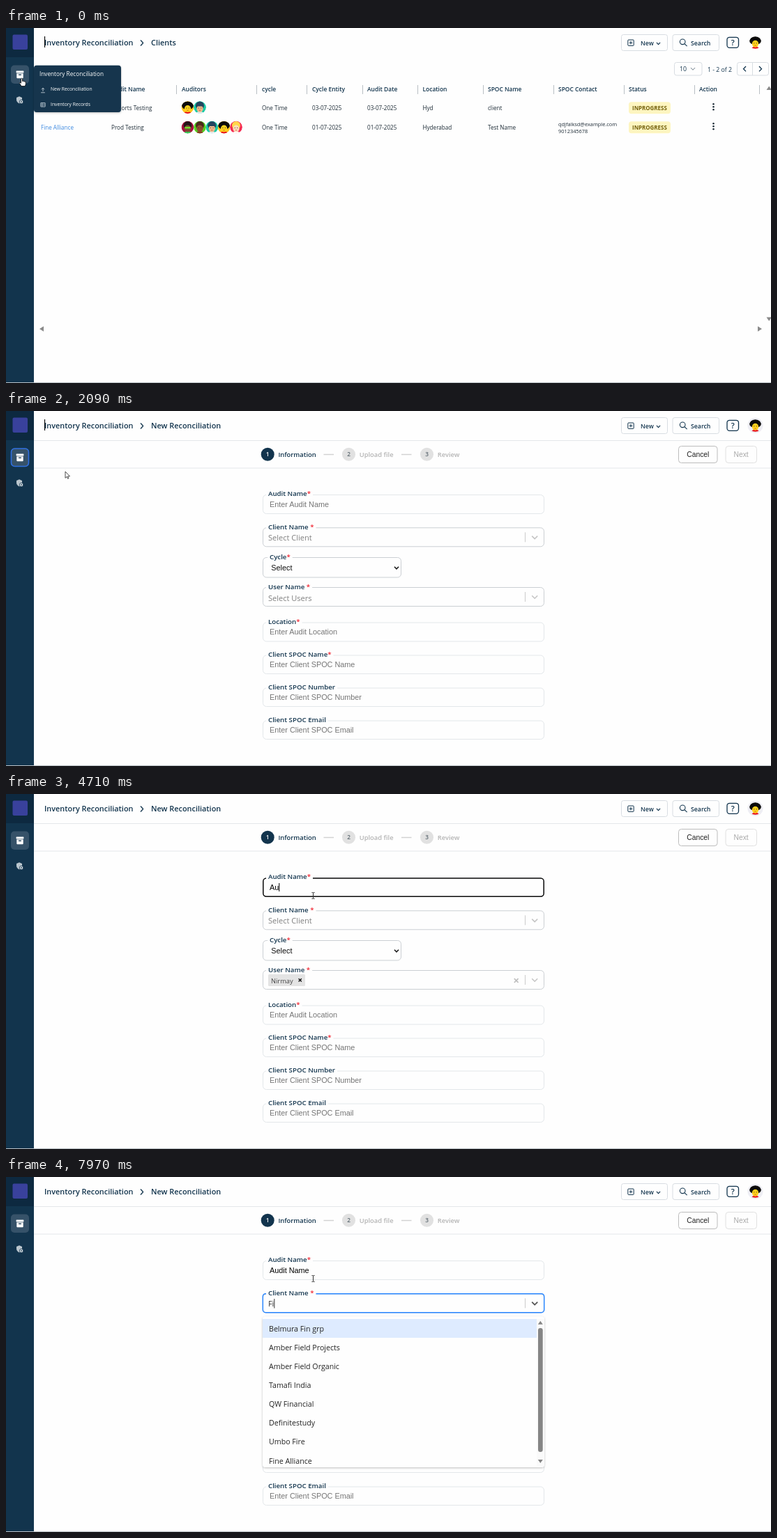
Animation, 1097 px wide and 510 px high, one loop 8 s. Source, as an HTML page:

```html
<!DOCTYPE html>
<html lang="en">
<head>
<meta charset="utf-8">
<title>Inventory Reconciliation</title>
<style>
  html, body { margin: 0; width: 100%; height: 100%; overflow: hidden; background: #fefefe; }
  svg { display: block; width: 100%; height: 100%; }
  text { font-family: "Open Sans", "Noto Sans", sans-serif; white-space: pre; }
  .input { font-family: "Liberation Sans", Arial, sans-serif; }
</style>
</head>
<body>
<svg id="stage" viewBox="0 0 1097 510"></svg>
<script>
const LOOP = 8000, NAVY = '#12344d', GREY = '#757575';
const stage = document.getElementById('stage');

// y is the middle of the capitals
const text = (x, y, s, size, fill = NAVY, weight = 400, attrs = '') =>
  `<text x="${x}" y="${(y + size * 0.357).toFixed(2)}" font-size="${size}" font-weight="${weight}" fill="${fill}" ${attrs}>${s}</text>`;
const input = (x, y, s, fill = GREY, size = 10.85, attrs = '') =>
  text(x, y, s, size, fill, 400, `class="input" ${attrs}`);
const rect = (x, y, w, h, fill, r = 0, attrs = '') =>
  `<rect x="${x}" y="${y}" width="${w}" height="${h}" rx="${r}" fill="${fill}" ${attrs}/>`;
const box = (x, y, w, h, stroke, r = 4, width = 1, attrs = '') =>
  rect(x, y, w, h, 'none', r, `stroke="${stroke}" stroke-width="${width}" ${attrs}`);
const line = (d, stroke, width = 1, attrs = '') =>
  `<path d="${d}" fill="none" stroke="${stroke}" stroke-width="${width}" ${attrs}/>`;
const shape = (d, fill, attrs = '') => `<path d="${d}" fill="${fill}" ${attrs}/>`;
const dot = (x, y, r, fill, attrs = '') => `<circle cx="${x}" cy="${y}" r="${r}" fill="${fill}" ${attrs}/>`;
const oval = (x, y, rx, ry, fill) => `<ellipse cx="${x}" cy="${y}" rx="${rx}" ry="${ry}" fill="${fill}"/>`;
const group = (id, body, attrs = '') => `<g id="${id}" ${attrs}>${body}</g>`;
const chevron = (x, y, w, h, stroke, width = 1.2) =>
  line(`M${x - w} ${y - h / 2}l${w} ${h}l${w} ${-h}`, stroke, width);
const cross = (x, y, r, stroke, width) =>
  line(`M${x - r} ${y - r}l${2 * r} ${2 * r}m0 ${-2 * r}l${-2 * r} ${2 * r}`, stroke, width);

function avatar(x, y, bg, hair, skin, shirt, extra = '', hairWidth = 6) {
  return `<g transform="translate(${x} ${y})" clip-path="url(#face)">` +
    dot(0, 0, 9, bg) + oval(0, -2.5, hairWidth, 6, hair) + oval(0, 9, 6, 3, shirt) +
    oval(0, 2, 4.6, 5, skin) +
    dot(-1.7, 1, .6, '#222') + dot(1.7, 1, .6, '#222') +
    line('M-1.2 4q1.2 1 2.4 0', '#a33', .7) + extra + '</g>';
}
const curly = (x, y, bg) => avatar(x, y, bg, '#0b0b0b', '#ffd21c', '#e8121c', '', 8.4);
const capped = (x, y) => avatar(x, y, '#19cba6', '#24445f', '#f0b98a', '#e9eef2',
  rect(-6, -4, 11, 2.4, '#24445f', 1));
const shades = rect(-4.2, -.6, 8.4, 2.6, '#6ee02a', 1);

function header() {
  return rect(0, 0, 40, 510, NAVY) + rect(0, 0, 40, 42, '#0d2940') +
    rect(9.5, 9.5, 21.5, 21.5, '#39419c', 2) +
    rect(7, 53.5, 26, 26.5, '#365269', 5) +
    box(7.5, 54, 25, 25.5, '#2f6fe0', 5, 1.6, 'id="ring"') +
    rect(14.6, 61.4, 10.8, 3, '#fff', .6) +
    shape('M15.3 65.2h9.4v6q0 1-1 1h-7.4q-1 0-1-1zM18 66.6v1.3h4v-1.3z', '#fff', 'fill-rule="evenodd"') +
    shape('M15 100l4-1.7l4 1.7v3.2q-.3 3.6-4 5.2q-3.7-1.6-4-5.2z', '#b9c5cd') +
    dot(22, 106, 2.7, '#dfe6ea', `stroke="${NAVY}" stroke-width=".8"`) + dot(22, 106, .9, NAVY) +
    text(55, 20.9, 'Inventory Reconciliation', 10.9, NAVY, 600) +
    line('M193 17.5l3.6 4l-3.6 4', NAVY, 1.3) +
    rect(55, 12, 1.1, 16, '#000', 0, 'id="titleCaret"') +
    box(882.5, 9.5, 66, 23, '#d8dde2', 3) +
    box(891.8, 17, 8.4, 8.4, NAVY, 1) + line('M893.7 21.2h4.6m-2.3-2.3v4.6', NAVY) +
    text(910, 21.4, 'New', 8.7, NAVY, 600) + chevron(935.5, 22.3, 2.6, 2.8, NAVY) +
    box(956, 9.5, 66.5, 23, '#d8dde2', 3) +
    dot(970.2, 19.8, 3.8, 'none', `stroke="${NAVY}" stroke-width="1.1"`) + line('M973 22.6l3.6 3.6', NAVY, 1.1) +
    text(982, 21.4, 'Search', 8.75, NAVY, 600) +
    box(1034, 13.3, 16.5, 15, NAVY, 3.5, 1.3) + text(1042.2, 21, '?', 11, NAVY, 600, 'text-anchor="middle"');
}

const COLUMNS = [[151, 'Audit Name'], [252, 'Auditors'], [367, 'cycle'], [439, 'Cycle Entity'], [518, 'Audit Date'],
  [597.5, 'Location'], [691, 'SPOC Name'], [792, 'SPOC Contact'], [893, 'Status'], [994, 'Action']];

function row(y, name, date, place, contact) {
  const cells = [[151, name], [367, 'One Time'], [439, date], [518, date], [597.5, place], [691, contact]];
  return cells.map(([x, s]) => text(x, y, s, 8.15, '#1d2b36')).join('') +
    rect(893, y - 8.5, 60, 17, '#fdf5c0', 4) + text(898, y + .3, 'INPROGRESS', 7.95, '#75620c', 700) +
    [-4, 0, 4].map(d => dot(1014.5, y - 1.5 + d, 1.25, '#1d2b36')).join('');
}

function listPage() {
  return text(208, 20.9, 'Clients', 10.9, NAVY, 600) + curly(1074.5, 20.8, '#fefefe') +
    box(958.5, 49.5, 39.5, 18.5, '#d8dde2', 3) + text(966, 58.5, '10', 8.8) + chevron(985, 58.7, 3, 3.2, '#6a7a86', 1) +
    text(1006, 59.7, '1 - 2 of 2', 8.7) +
    box(1048.5, 49.5, 45, 18.5, '#d8dde2', 3) + line('M1070.5 49.5v18.5', '#d8dde2') +
    line('M1061 55l-3.5 3.7l3.5 3.7M1080 55l3.5 3.7l-3.5 3.7', NAVY, 1.3) +
    COLUMNS.map(([x, s]) => text(x, 88.2, s, 8.45, NAVY, 600)).join('') +
    [244, 359, 431, 511, 590, 684, 785, 886, 987, 1080].map(x => line(`M${x}.5 82v13`, '#b9bfc4')).join('') +
    row(114.7, 'Reports Testing', '03-07-2025', 'Hyd', 'client') +
    row(142.7, 'Prod Testing', '01-07-2025', 'Hyderabad', 'Test Name') +
    text(50, 142.7, 'Fine Alliance', 8.1, '#3f8ae0') +
    text(792, 138.2, 'qdjfalksd@example.com', 7.4, '#1d2b36') + text(792, 148.2, '9012345678', 7.4, '#1d2b36') +
    curly(260.5, 114, '#ffc91c') + capped(278, 114) +
    avatar(260.5, 142.5, '#a8123f', '#241418', '#7d4a35', '#35d05a', shades) +
    avatar(278, 142.5, '#55d01f', '#4a2a1c', '#8d5030', '#8a3b20') +
    capped(295.3, 142.5) + curly(312.6, 142.5, '#ffc91c') +
    avatar(330, 142.5, '#f52a52', '#ffd84a', '#ffdcb8', '#fff') +
    shape('M1090.5 89l3.7-5.5l3.7 5.5zM1090.5 415.5l3.7 5.5l3.7-5.5zM54 428.5l-6 3.7l6 3.7zM1078 428.5l6 3.7l-6 3.7z', '#8a8a8a') +
    rect(40, 53.7, 125, 67.3, NAVY, 4, 'filter="url(#soft)"') +
    text(48, 65.8, 'Inventory Reconciliation', 8.23, '#fff') +
    text(64, 87.8, 'New Reconciliation', 6.75, '#fff', 500) +
    text(64, 109.8, 'Inventory Records', 6.75, '#fff', 500) +
    line('M53 91v-4.5M51 88.3l2-2.2l2 2.2M50.2 92.8h5.6', '#c5d0d8', .9) +
    box(49.8, 107.5, 6.4, 5.6, '#c5d0d8', .3, .8) + line('M50 109.3h6M50 111.2h6M52 107.5v5.6', '#c5d0d8', .6);
}

const step = (x, n, label, on) =>
  dot(x, 62.2, 9.5, on ? NAVY : '#e1e1e1') +
  text(x, 62.5, n, 8.3, on ? '#fff' : '#5c6870', 600, 'text-anchor="middle"') +
  text(x + 15.2, 63.1, label, 9.4, on ? NAVY : '#b4b4b4', 600);
const label = (x, y, s, star = '') =>
  text(x, y, s + (star && `<tspan fill="#f0202c">${star}</tspan>`), 9.7, NAVY, 600, 'data-label=""');
const field = (y, h = 27, w = 403, stroke = '#e3e7ea') => box(368.5, y, w, h, stroke, 5);
const picker = y => field(y, 27, 403, '#cbcfd3') + line(`M744.5 ${y + 6.5}v14`, '#ccc') +
  chevron(758.2, y + 13.8, 4, 4, '#c4c4c4', 1.5);

function formPage() {
  return text(208, 20.9, 'New Reconciliation', 10.9, NAVY, 600) +
    dot(1074.5, 20.8, 11, '#eeeef4') + curly(1074.5, 20.8, '#eeeef4') +
    line('M40 42.5H1097M40 82H1097', '#e4e7ea') +
    step(375.2, 1, 'Information', true) + step(491.5, 2, 'Upload file') + step(603.5, 3, 'Review') +
    line('M455.5 62.5h14.5M567 62.5h14.5', '#d2d2d2', 1.3) +
    box(964.5, 50.5, 55.5, 24, '#bcbcbc') + input(976.3, 62.3, 'Cancel', '#222', 10.3) +
    box(1032, 50.5, 44.5, 24, '#e0e0e0') + input(1043.5, 62.3, 'Next', '#a8a8a8', 10.3) +
    field(120.5) + box(368.8, 120.9, 402.4, 26.4, '#0a0a0a', 4.5, 1.5, 'id="auditFocus"') +
    label(376, 119, 'Audit Name', '*') +
    input(378, 134, 'Enter Audit Name', GREY, 10.85, 'id="auditHint"') +
    input(378, 134, '', '#000', 10.85, 'id="auditText"') + rect(0, 128, 1, 12, '#000', 0, 'id="auditCaret"') +
    picker(167.8) +
    group('clientFocus', box(368.3, 167.7, 403.4, 27, '#2684ff', 4, 1.45) + chevron(758.2, 181.6, 4, 4, '#555', 1.6)) +
    label(376, 166.6, 'Client Name ', '*') +
    text(376, 182.3, 'Select Client', 11.05, '#808080', 400, 'id="clientHint"') +
    text(376, 182.3, '', 10.8, '#333', 400, 'id="clientText"') + rect(0, 175, 1, 13.5, '#333', 0, 'id="clientCaret"') +
    field(210.5, 28.5, 198, '#cbcfd3') + label(378, 209.3, 'Cycle', '*') +
    input(380.3, 225, 'Select', '#111') + chevron(560, 225.3, 3, 3.2, '#111', 1.5) +
    picker(253.5) + label(376, 252.5, 'User Name ', '*') +
    text(376, 268.8, 'Select Users', 11.05, '#808080', 400, 'id="userHint"') +
    group('chip', rect(376, 259, 53, 17, '#e4e4e4', 1.5) + text(380, 268.2, 'Nirmay', 9.3, '#444') +
      cross(421.7, 267.4, 2.1, '#111', 1.4) + cross(731.7, 268, 2.9, '#bdbdbd', 1.5)) +
    field(304) + label(376, 302.3, 'Location', '*') + input(378, 317.3, 'Enter Audit Location') +
    field(351, 26.5) + label(376, 349.7, 'Client SPOC Name', '*') + input(378, 364.3, 'Enter Client SPOC Name') +
    field(398, 26.5) + label(376, 396.6, 'Client SPOC Number') + input(378, 411.3, 'Enter Client SPOC Number') +
    field(445, 26.5) + label(376, 443.7, 'Client SPOC Email') + input(378, 458.3, 'Enter Client SPOC Email') +
    group('menu', rect(368, 200.5, 404, 216.5, '#fefefe', 4, 'filter="url(#soft)"') +
      rect(368, 204, 393, 27, '#deebff') + rect(761, 204, 10.5, 212, '#fafafa') +
      shape('M762.8 211.7l3.5-5l3.5 5zM762.8 406l3.5 5l3.5-5z', '#858585') +
      rect(763, 217, 6.7, 178, '#858585', 3.3, 'id="thumb"') +
      group('options', '', 'clip-path="url(#menuClip)"'));
}

const CURSORS = {
  hand: shape('M-1 1Q0 -.5 1 1V4.5Q2 3.6 2.8 4.8Q3.8 4 4.4 5.2Q5.6 4.8 5.8 6V8.6Q5.6 10 4.8 11.6H-.6Q-1.4 9.4 -3.2 7.4Q-3.2 6 -1.8 6.6L-1 7.2Z', '#fff', 'stroke="#000" stroke-width=".8"'),
  arrow: shape('M0 0V9.3L2.2 7.3L3.6 10.3L4.9 9.7L3.6 6.8H6.5Z', '#fff', 'stroke="#222" stroke-width=".8"'),
  beam: line('M-2 -4.5H-.6L0 -4L.6 -4.5H2M0 -4V4M-2 4.5H-.6L0 4L.6 4.5H2', '#333', 1)
};

stage.innerHTML = `<defs>
  <clipPath id="face"><circle r="9"/></clipPath>
  <clipPath id="menuClip"><rect x="368" y="201" width="393" height="214.5"/></clipPath>
  <filter id="soft" x="-5%" y="-10%" width="110%" height="120%"><feDropShadow dx="0" dy="1" stdDeviation="1.5" flood-opacity=".25"/></filter>
  </defs>` + rect(0, 0, 1097, 510, '#fefefe') + header() + group('list', listPage()) + group('form', formPage()) +
  line('M0 509.5H1097', '#b9c0c5') +
  group('progress', rect(0, 0, 1, 2, '#1b3d60', 0, 'id="bar"') + rect(0, 2, 42, 1.2, '#1b3d60', 0, 'id="peg" opacity=".4"')) +
  group('cursor', Object.entries(CURSORS).map(([k, v]) => group(k, v)).join(''));

const ui = {};
stage.querySelectorAll('[id]').forEach(el => ui[el.id] = el);

// Labels interrupt the field borders behind them
stage.querySelectorAll('[data-label]').forEach(el => {
  const x = +el.getAttribute('x'), y = +el.getAttribute('y');
  el.insertAdjacentHTML('beforebegin', rect(x - 3, y - 7, el.getComputedTextLength() + 6, 9, '#fefefe'));
});

const FULL = ['Belmura Fin grp', 'Amber Field Projects', 'Amber Field Organic', 'Tamafi India',
  'QW Financial', 'Definitestudy', 'Umbo Fire', 'Fine Alliance'];
const WIDE = ['Leafy Orchard Co', 'Belmura Fin grp', 'Craft Valley Mills', 'Amber Field Projects',
  'Amber Field Organic', 'Fresh Meadow Foods', 'Tamafi India', 'QW Financial'];
const AUDIT_KEYS = [4310, 4710, 4860, 4990, 5150, 5240, 5600, 5720, 5830, 5950, 6190];
const CLIENT_KEYS = [7450, 7970];
const TITLE_BLINK = [190, 720, 1250, 1680, 1860, 2050, 2580, 3110, 3640];
const PATH = [[370, 22.5, 72], [770, 66.5, 72], [1150, 82, 85], [1340, 85, 87], [2240, 85, 87],
  [2600, 210, 128], [3040, 362, 166], [3220, 392, 163], [3500, 424, 153], [3800, 440.5, 146]];
const BAR = [[2240, 40], [2500, 250], [3040, 482], [3220, 538], [3400, 610], [3560, 1097]];

function at(table, t, i = 1) {
  if (t <= table[0][0]) return table[0][i];
  for (let k = 1; k < table.length; k++) {
    const a = table[k - 1], b = table[k];
    if (t < b[0]) return a[i] + (b[i] - a[i]) * (t - a[0]) / (b[0] - a[0]);
  }
  return table[table.length - 1][i];
}
const count = (times, t) => times.filter(x => x <= t).length;
const show = (el, on) => el.setAttribute('display', on ? 'inline' : 'none');
const clamp = x => Math.max(0, Math.min(1, x));

function type(name, word, keys, t, x, start, end) {
  const n = count(keys, t), el = ui[name + 'Text'], caret = ui[name + 'Caret'];
  const s = word.slice(0, n);
  if (el.textContent !== s) el.textContent = s;
  show(ui[name + 'Hint'], !n);
  const since = t - (n ? keys[n - 1] : start);
  show(caret, t >= start && t < end && since % 1060 < 535);
  caret.setAttribute('x', x + (n ? el.getComputedTextLength() : 0));
}

let optionSet;
function setOptions(list) {
  if (list === optionSet) return;
  optionSet = list;
  ui.options.innerHTML = list.map((s, i) => text(377, 218 + 27.1 * i, s, 10.65, '#222')).join('');
  ui.thumb.setAttribute('height', list === FULL ? 178 : 92);
}

function render(t) {
  const onForm = t >= 2050;
  show(ui.list, !onForm);
  show(ui.form, onForm);
  show(ui.ring, onForm && t < 2240);
  show(ui.titleCaret, count(TITLE_BLINK, t) % 2 === 0);

  show(ui.chip, t >= 2700);
  show(ui.userHint, t < 2700);
  show(ui.auditFocus, t >= 3880 && t < 6890);
  ui.clientFocus.setAttribute('opacity', clamp((t - 6870) / 120));
  type('audit', 'Audit Name ', AUDIT_KEYS, t, 378, 3880, 6890);
  type('client', 'Fi', CLIENT_KEYS, t, 376, 6890, LOOP);
  show(ui.menu, t >= 7450);
  setOptions(t < 7970 ? WIDE : FULL);

  const end = at(BAR, t);
  show(ui.progress, t >= 2240 && t < 3800);
  ui.progress.setAttribute('opacity', clamp((3800 - t) / 200));
  ui.bar.setAttribute('width', end);
  ui.peg.setAttribute('x', end - 42);

  const kind = !onForm ? 'hand' : t < 3600 ? 'arrow' : 'beam';
  for (const k in CURSORS) show(ui[k], k === kind);
  ui.cursor.setAttribute('transform', `translate(${at(PATH, t)} ${at(PATH, t, 2)})`);
}

const t0 = performance.now();
function tick() {
  render((performance.now() - t0) % LOOP);
  requestAnimationFrame(tick);
}
tick();
</script>
</body>
</html>
```
